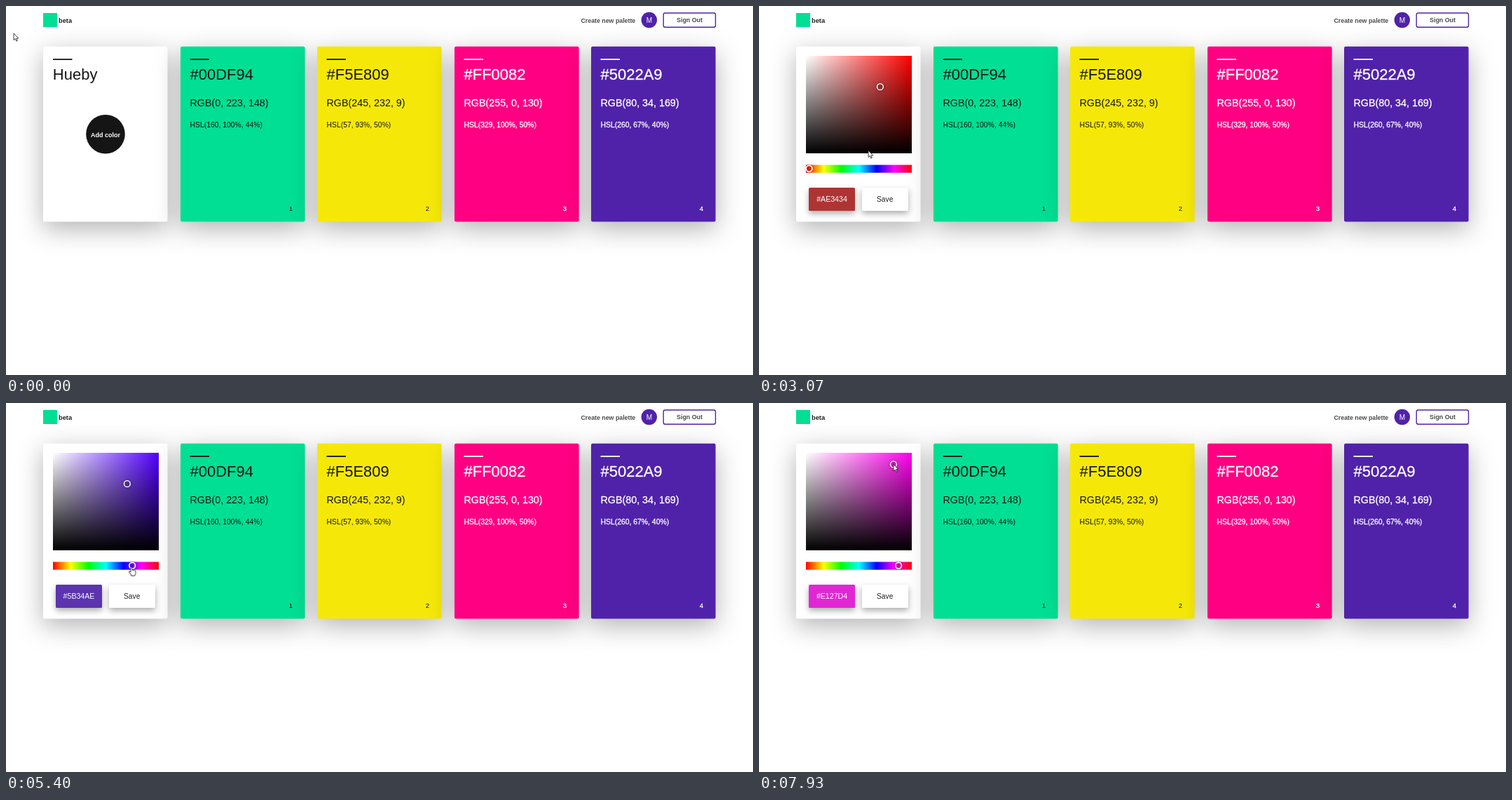
An HTML page that plays this animation: 1066 by 526 pixels, repeating every 8000 ms.

```html
<!DOCTYPE html>
<html lang="en">
<head>
<meta charset="utf-8">
<title>Palette</title>
<style>
  html, body { margin: 0; width: 100%; height: 100%; overflow: hidden; background: #fff; }
  svg { display: block; width: 100%; height: 100%; font-family: "Liberation Sans", Arial, sans-serif; }
  .bold { font-weight: 700; }
  .mid { text-anchor: middle; }
  .card { filter: drop-shadow(0 10px 18px rgba(0, 0, 0, .3)); }
  .key { filter: drop-shadow(0 4px 4px rgba(0, 0, 0, .32)); }
  .knob { fill: rgba(0, 0, 0, .08); stroke: #fff; filter: drop-shadow(0 0 1.5px rgba(0, 0, 0, .5)); }
  .cursor { fill: #fff; stroke: #111; stroke-width: .8; stroke-linejoin: round; }
</style>
</head>
<body>
<svg viewBox="0 0 1066 526">
  <defs>
    <linearGradient id="white">
      <stop stop-color="#fff"/><stop offset="1" stop-color="#fff" stop-opacity="0"/>
    </linearGradient>
    <linearGradient id="black" x2="0" y2="1">
      <stop stop-color="#000" stop-opacity="0"/><stop offset="1" stop-color="#000"/>
    </linearGradient>
    <linearGradient id="rainbow"></linearGradient>
  </defs>

  <g id="cards"></g>

  <g class="bold" fill="#4c4c4c">
    <rect x="53" y="10" width="20" height="20" fill="#00df94"/>
    <text x="75" y="24" font-size="9.3" fill="#222">beta</text>
    <text x="820.5" y="23.7" font-size="8.8">Create new palette</text>
    <circle cx="917.8" cy="20" r="11.2" fill="#5022a9"/>
    <text class="mid" x="917.8" y="24" font-size="10" font-weight="400" fill="#fff">M</text>
    <rect x="938.2" y="10" width="74.3" height="20.2" rx="2.5" fill="#fff" stroke="#5022a9" stroke-width="1.4"/>
    <text class="mid" x="975.5" y="23" font-size="8.9">Sign Out</text>
  </g>

  <g id="front">
    <rect x="67" y="75.2" width="27.5" height="1.8" fill="#151515"/>
    <text x="66.8" y="105.4" font-size="22" fill="#151515">Hueby</text>
    <circle cx="142" cy="182.7" r="27.8" fill="#151515"/>
    <text class="mid bold" x="142" y="187" font-size="9" fill="#fff">Add color</text>
  </g>

  <g id="picker">
    <rect id="base" x="67" y="71" width="151" height="139"/>
    <rect x="67" y="71" width="151" height="139" fill="url(#white)"/>
    <rect x="67" y="71" width="151" height="139" fill="url(#black)"/>
    <rect x="67" y="226.5" width="151" height="11.2" fill="url(#rainbow)"/>
    <circle id="spot" class="knob" r="4.4" stroke-width="1.5"/>
    <circle id="slider" class="knob" cy="231.7" r="4.3" stroke-width="1.8"/>
    <rect id="swatch" class="key" x="71" y="259" width="66" height="33" rx="1.5"/>
    <text id="code" class="mid" x="104" y="279" font-size="10.6"></text>
    <rect class="key" x="147" y="259" width="66" height="33" rx="1.5" fill="#fff"/>
    <text class="mid" x="179.7" y="279" font-size="10.2" fill="#222">Save</text>
  </g>

  <g id="cursor" class="cursor">
    <path id="arrow" d="M0 0V9.6L2.2 7.6L3.8 11.1L5.3 10.4L3.8 7.1H6.8Z"/>
    <path id="hand" d="M-1 1Q0 -.6 1 1V4.8Q1.9 4 2.8 5Q3.8 4.4 4.6 5.4Q6 5.1 6.1 6.6V9Q6 10.6 5 11.3V12.8H-.4V11.4L-3.4 7.6Q-3.6 6 -2.2 6.4L-1 7.6Z"/>
  </g>
</svg>

<script>
const $ = id => document.getElementById(id);
const clamp = v => Math.max(0, Math.min(1, v));
const TICK = 200 / 3, TICKS = 120;
const FIELD = { x: 67, y: 71, w: 151, h: 139 };

function rgbOf(hex) {
  return [1, 3, 5].map(i => parseInt(hex.slice(i, i + 2), 16));
}

function hslOf([r, g, b]) {
  const max = Math.max(r, g, b), min = Math.min(r, g, b), d = max - min, sum = max + min;
  const sector = max === r ? (g - b) / d + 6 : max === g ? (b - r) / d + 2 : (r - g) / d + 4;
  const sat = d / (sum > 255 ? 510 - sum : sum);
  return [sector % 6 * 60, sat * 100, sum / 5.1].map(Math.round);
}

function hsvHex(h, s, v) {
  const channel = n => {
    const k = (n + h / 60) % 6;
    return Math.round(255 * v * (1 - s * clamp(Math.min(k, 4 - k))));
  };
  return '#' + [5, 3, 1].map(n => channel(n).toString(16).padStart(2, '0')).join('').toUpperCase();
}

const cardX = i => Math.round(53.3 + 195.4 * i);
const cardRect = (i, fill) =>
  `<rect class="card" x="${cardX(i)}" y="57.8" width="177.6" height="249.7" rx="2.2" fill="${fill}"/>`;

function colorCard(hex, i) {
  const n = i + 1, left = cardX(n) + 13.5;
  const rgb = rgbOf(hex), [h, s, l] = hslOf(rgb);
  const light = rgb[1] < 128, ink = light ? '#fff' : '#151515';
  const line = (y, size, text) => `<text x="${left}" y="${y}" font-size="${size}">${text}</text>`;
  return cardRect(n, hex) + `<g fill="${ink}">
    <rect x="${left}" y="75.2" width="27.5" height="1.8"/>
    <g stroke="${ink}" stroke-width="${light ? 0.3 : 0}">
      ${line(105.4, 22, hex)}
      ${line(142.8, 14.3, `RGB(${rgb.join(', ')})`)}
      ${line(173.3, 10.4, `HSL(${h}, ${s}%, ${l}%)`)}
      <text x="${left + 146.7}" y="291.6" font-size="9.6" text-anchor="end">${n}</text>
    </g></g>`;
}

$('cards').innerHTML = cardRect(0, '#fff') +
  ['#00DF94', '#F5E809', '#FF0082', '#5022A9'].map(colorCard).join('');
$('rainbow').innerHTML = [0, 1, 2, 3, 4, 5, 6]
  .map(i => `<stop offset="${i / 6}" stop-color="hsl(${i * 60 % 360},100%,50%)"/>`).join('');

// Each move: first tick, last tick, then where it ends
const glide = (origin, moves, n) => moves.reduce(
  (now, [from, to, ...end]) => now.map((v, i) => v + (end[i] - v) * clamp((n - from) / (to - from))),
  origin);

const pointer = n => glide([11, 39], [
  [0, 14, 144, 187],      // to the button
  [34, 36, 141, 145],     // into the field
  [36, 40, 172.9, 115.2],
  [41, 46, 156, 206],     // down to the slider
  [46, 55, 155, 230],
  [66, 81, 179, 233.5],   // drag the hue
  [93, 100, 195, 236],
  [106, 112, 172.9, 115.2],
  [113, 119, 191.9, 87.4] // drag the shade
], n);

const hueAt = n => glide([0], [
  [58, 59, 200], [66, 72, 209], [72, 81, 259.2], [93, 100, 303], [102, 103, 304.2]
], n)[0];

// The shade is picked by a click, then by a drag
function shadeAt(n) {
  if (n < 40) return [0, 1];
  const [x, y] = pointer(n < 113 ? 40 : n);
  return [(x - FIELD.x) / FIELD.w, 1 - (y - FIELD.y) / FIELD.h];
}

const set = (id, attrs) => {
  for (const name in attrs) $(id).setAttribute(name, attrs[name]);
};

function render(ms) {
  const n = Math.floor(ms / TICK + 0.1) % TICKS;

  const open = 1 - (1 - clamp((n - 22) / 8)) ** 2;
  set('front', { opacity: clamp(1 - open * 1.5) });
  set('picker', { opacity: open, transform: `translate(0 ${-34 * (1 - open)})` });

  const hue = hueAt(n), [s, v] = shadeAt(n);
  const color = hsvHex(hue, s, v);
  set('base', { fill: hsvHex(hue, 1, 1) });
  set('spot', { cx: FIELD.x + s * FIELD.w, cy: FIELD.y + (1 - v) * FIELD.h });
  set('slider', { cx: FIELD.x + 4.5 + hue / 360 * FIELD.w });
  set('swatch', { fill: color });
  set('code', { fill: s < 0.2 ? '#222' : '#fff' });
  $('code').textContent = color;

  const [x, y] = pointer(n);
  const hand = (n >= 14 && n < 25) || (n >= 54 && n < 100);
  set('cursor', { transform: `translate(${x} ${y})` });
  set('arrow', { visibility: hand ? 'hidden' : 'visible' });
  set('hand', { visibility: hand ? 'visible' : 'hidden' });
}

const start = performance.now();
function loop() {
  render((performance.now() - start) % (TICK * TICKS));
  requestAnimationFrame(loop);
}
render(0);
requestAnimationFrame(loop);
</script>
</body>
</html>
```
